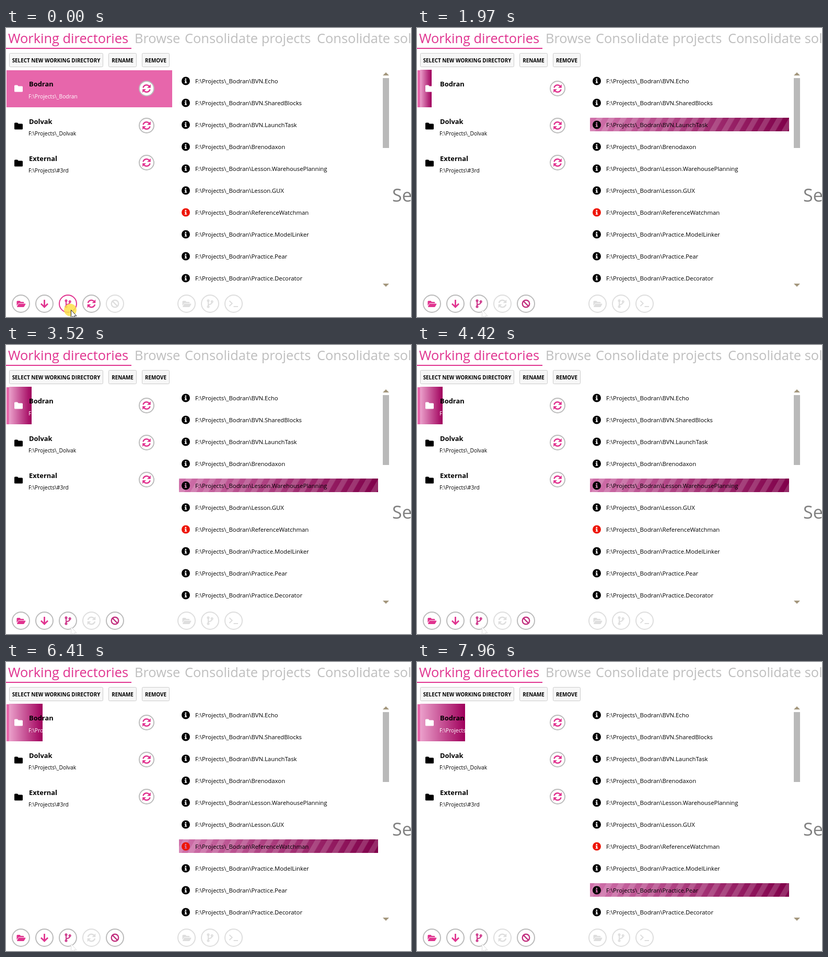
These frames come from a looping animation (775 by 554 pixels, 8000 ms). An HTML page:

```html
<!DOCTYPE html>
<html lang="en">
<head>
<meta charset="utf-8">
<title>Working directories</title>
<style>
  html, body { margin: 0; width: 100%; height: 100%; overflow: hidden; background: #fff; }
  svg { display: block; width: 775px; height: 554px; font-family: "Open Sans", "Noto Sans", sans-serif; }
  .tab { font-size: 25.4px; fill: #bebebe; }
  .tab.on { fill: #e0338f; }
  .cap { font-size: 9.9px; font-weight: 700; text-anchor: middle; }
  .name { font-size: 12.9px; font-weight: 700; }
  .dir { font-size: 10.3px; }
  .path { font-size: 11.35px; }
  .line { fill: none; stroke: currentColor; stroke-width: 2.4; }
  .icon { fill: currentColor; }
</style>
</head>
<body>
<svg id="stage" viewBox="0 0 775 554"></svg>
<script>
const PINK = '#e0338f', MUTED = '#dedede', RING = '#bbb';
const LOOP = 8000, BUSY_FROM = 60;
// Moment at which each repository starts being processed.
const rowStarts = [110, 480, 1380, 2300, 3270, 4450, 5580, 6780, 7780];

const root = String.raw`F:\Projects` + '\\';
const folders = [
  { name: 'Bodran', dir: '_Bodran', y: 80 },
  { name: 'Dolvak', dir: '_Dolvak', y: 152 },
  { name: 'External', dir: '#3rd', y: 223 }
];
const repos = ['BVN.Echo', 'BVN.SharedBlocks', 'BVN.LaunchTask', 'Brenodaxon',
  'Lesson.WarehousePlanning', 'Lesson.GUX', 'ReferenceWatchman',
  'Practice.ModelLinker', 'Practice.Pear', 'Practice.Decorator'];

const halfSync = '<path class="line" d="M-6.6-1.4A6.8 6.8 0 0 1 5-4.6"/><path class="icon" d="M7.8-8v6.8H1z"/>';
const icons = {
  folder: '<path class="icon" d="M-8-5q0-1.5 1.5-1.5h4.3l2 2h6.7q1.5 0 1.5 1.5v8q0 1.5-1.5 1.5h-13q-1.5 0-1.5-1.5z"/>',
  open: '<path class="icon" d="M-8 4V-4q0-1.5 1.5-1.5h4.3l2 2h4.7q1.5 0 1.5 1.5v1H-3.2q-1.3 0-2 1.1z"/>' +
        '<path class="icon" d="M-3.6 .1H8.2q1.2 0 .6 1.1L6.3 5.5q-.6 1-1.6 1H-6.9q-1.1 0-.5-1.1l2.3-4.3q.5-1 1.5-1z"/>',
  down: '<path class="line" style="stroke-width:2.8" d="M0-7.5V6M-6.5 0L0 6.5 6.5 0"/>',
  branch: '<g class="line" style="stroke-width:2"><circle cx="-3.5" cy="-5.7" r="1.5"/><circle cx="-3.5" cy="5.7" r="1.5"/>' +
          '<circle cx="3.7" cy="-3.9" r="1.5"/><path d="M-3.5-4.2V4.2M3.7-2.4Q3.7 1-3.5 2"/></g>',
  sync: halfSync + `<g transform="rotate(180)">${halfSync}</g>`,
  ban: '<circle class="line" r="6.8"/><path class="line" d="M-4.8-4.8L4.8 4.8"/>',
  prompt: '<path class="line" style="stroke-width:2" d="M-8-5.5l5.2 5-5.2 5M0 5.5h8.5"/>'
};

const at = (x, y, body, color = '#000', id = '') =>
  `<g ${id && `id="${id}"`} transform="translate(${x} ${y})" color="${color}">${body}</g>`;
const text = (cls, x, y, str, fill = '') =>
  `<text class="${cls}" x="${x}" y="${y}" ${fill && `fill="${fill}"`}>${str}</text>`;
const round = (icon, x, y, r, color = PINK, ring = RING, id = '') =>
  at(x, y, `<circle class="ring" r="${r}" fill="#fff" stroke="${ring}" stroke-width="2"/>${icons[icon]}`, color, id);
const button = (x, w, label) =>
  `<rect x="${x + .5}" y="48.5" width="${w - 1}" height="26" rx="2" fill="#f7f7f7" stroke="#ccc"/>` +
  text('cap', x + w / 2, 66, label);

const folderItem = ({ name, dir, y }, i) => {
  const color = i ? '#000' : '#fff';
  return at(24, y + 36, icons.folder, color) +
    text('name', 44, y + 32, name) +
    text('dir', 43, y + (i ? 54 : 55), root + dir, color) +
    round('sync', 269, y + (i ? 35 : 36), 14);
};

// The letter is a hole, so that the row's background shows through.
const infoIcon = 'M-8 0a8 8 0 1 0 16 0a8 8 0 1 0-16 0z' +
  'M-1.5-4.7h2.6v2.4h-2.6zM-2.2-1.3h3.3v4h1.1v1.6h-4.4v-1.6h1.1v-2.4h-1.1z';
const repoRow = (repo, i) =>
  at(344, 101.5 + 42 * i, `<path class="icon" fill-rule="evenodd" d="${infoIcon}"/>`, i === 6 ? '#ee1506' : '#000') +
  text('path', 362, 106 + 42 * i, root + '_Bodran\\' + repo);

const stage = document.getElementById('stage');
stage.innerHTML = `
  <defs>
    <linearGradient id="barFill"><stop stop-color="#d072ab"/><stop offset="1" stop-color="#80004a"/></linearGradient>
    <linearGradient id="doneFill"><stop stop-color="#eba0cb"/><stop offset="1" stop-color="#a0005c"/></linearGradient>
    <pattern id="stripes" width="23" height="40" patternUnits="userSpaceOnUse">
      <rect width="11.5" height="40" fill="#fff" fill-opacity=".17"/>
    </pattern>
  </defs>
  ${text('tab on', 4, 28.5, 'Working directories')}
  ${text('tab', 246, 28.5, 'Browse')}
  ${text('tab', 342, 28.5, 'Consolidate projects')}
  ${text('tab', 595, 28.5, 'Consolidate sol')}
  <rect y="38" width="240" height="2" fill="${PINK}"/>
  ${button(6, 180, 'SELECT NEW WORKING DIRECTORY')}
  ${button(196, 54, 'RENAME')}
  ${button(260, 53, 'REMOVE')}
  <rect id="selection" x="1" y="81" height="71" fill="#e766ab"/>
  <rect id="done" x="6" y="80" height="72" fill="url(#doneFill)"/>
  ${folders.map(folderItem).join('')}
  <g id="bar">
    <rect width="381" height="26" fill="url(#barFill)"/>
    <rect width="381" height="26" fill="url(#stripes)"/>
  </g>
  ${repos.map(repoRow).join('')}
  <path d="M721 91l6-6 6 6zM721 490l6 6 6-6z" fill="#a3967c"/>
  <rect x="721" y="96" width="12" height="134" fill="#b9b9b9"/>
  <text x="739" y="332.5" font-size="34" fill="#808080">Se</text>
  ${round('open', 28.5, 528.5, 16.5)}
  ${round('down', 73.5, 528.5, 16.5)}
  ${round('branch', 118.5, 528.5, 16.5, PINK, RING, 'branch')}
  ${round('sync', 163.5, 528.5, 16.5, PINK, RING, 'sync')}
  ${round('ban', 208.5, 528.5, 16.5, PINK, RING, 'ban')}
  ${['open', 'branch', 'prompt'].map((icon, i) => round(icon, 345.5 + 45 * i, 528.5, 16.5, MUTED, MUTED)).join('')}
  <circle id="glow" cx="123" cy="540.5" r="12" fill="#fbe04a" fill-opacity=".85"/>
  <path id="cursor" d="M124.5 540.5v15.5l3.5-3.3 2.6 6 2.4-1-2.6-5.8h4.6z" fill="#fff"/>`;

const el = id => document.getElementById(id);
const set = (node, attrs) => Object.entries(attrs).forEach(([key, value]) => node.setAttribute(key, value));
const paint = (id, color, ring) => {
  set(el(id), { color });
  set(el(id).querySelector('.ring'), { stroke: ring });
};

function render(time) {
  const busy = time >= BUSY_FROM;
  const row = rowStarts.filter(start => time >= start).length - 1;
  const right = 6.3 + 10.7 * Math.max(row, 0);

  set(el('selection'), { width: busy ? 5 : 317 });
  set(el('done'), { width: busy ? Math.round(right) - 6 : 0 });
  set(el('bar'), {
    transform: `translate(331 ${88 + 42 * row})`,
    visibility: row < 0 ? 'hidden' : 'visible'
  });
  set(el('stripes'), { patternTransform: `translate(${time * .03 % 23} 0) skewX(-30)` });

  paint('branch', busy ? '#cc3388' : PINK, busy ? RING : PINK);
  paint('sync', busy ? MUTED : PINK, busy ? MUTED : RING);
  paint('ban', busy ? '#c2317f' : MUTED, busy ? RING : MUTED);
  set(el('glow'), { opacity: Math.max(0, Math.min(1, 1 - (time - 50) / 250)) });
  set(el('cursor'), { stroke: time < 300 ? '#222' : '#ddd' });
}

function tick() {
  render(performance.now() % LOOP);
  requestAnimationFrame(tick);
}
tick();
</script>
</body>
</html>
```
